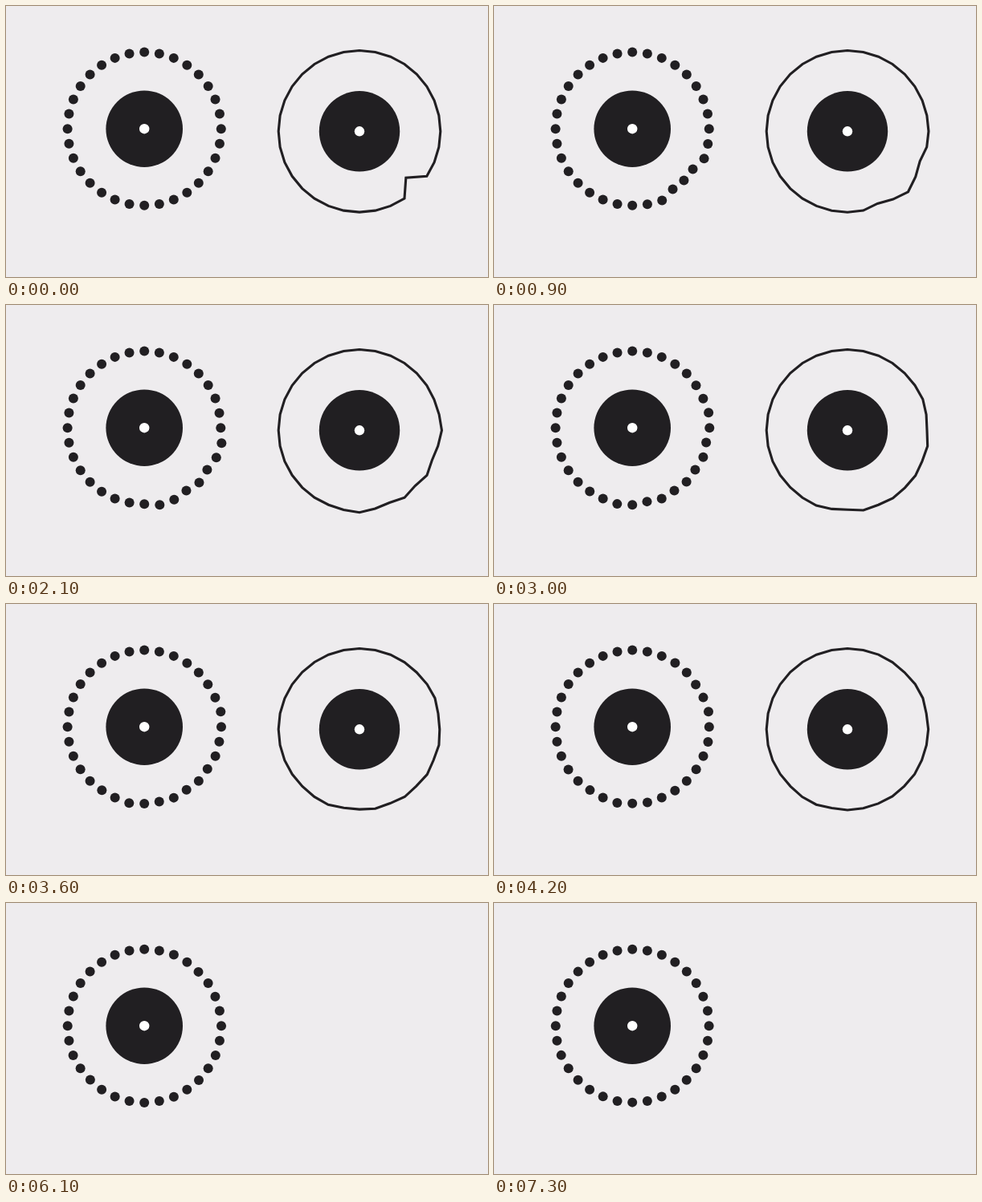
An HTML page with a canvas that plays this animation: 600x338 px, repeating every 7400 ms.

```html
<!DOCTYPE html>
<html lang="en">
<head>
<meta charset="utf-8">
<title>Plucked rings</title>
<style>
  html, body { margin: 0; width: 100%; height: 100%; overflow: hidden; background: #eeecee; }
  canvas { display: block; width: 600px; height: 338px; }
</style>
</head>
<body>
<canvas id="stage"></canvas>
<script>
const W = 600, H = 338, LOOP = 7400, STEP = 100;
const PAPER = '#eeecee', INK = '#211f22';
const TAU = Math.PI * 2;
const COUNT = 32, PLUCK = 4, OUTLINE_END = 4600;

// Spring chain: mean frequency (rad/s), neighbour coupling (rad/s), decay (1/s).
const FREQ = 10.65, COUPLING = 1.75, DECAY = 0.43;

const dotted = { x: 172.2, y: 153.2, radius: 95.6, disc: 47.8, pull: 16.5, release: 220 };
const outlined = { x: 440, y: 156.3, radius: 100.8, disc: 50.2, pull: 19, release: 0 };

const canvas = document.getElementById('stage');
const ctx = canvas.getContext('2d');
const ratio = window.devicePixelRatio || 1;
canvas.width = W * ratio;
canvas.height = H * ratio;
ctx.scale(ratio, ratio);

// Radial offset n points from the plucked one: the sum of the ring's standing waves.
function offset(ring, n, t) {
  const s = (t - ring.release) / 1000;
  if (s < 0) return 0;
  let sum = 0;
  for (let m = 0; m < COUNT; m++) {
    const k = m / COUNT * TAU;
    sum += Math.cos(k * n) * Math.cos((FREQ - COUPLING * Math.cos(k)) * s);
  }
  return -ring.pull * Math.exp(-DECAY * s) * sum / COUNT;
}

function ringPoints(ring, t) {
  return Array.from({ length: COUNT }, (_, i) => {
    const r = ring.radius + offset(ring, i - PLUCK, t);
    const angle = i / COUNT * TAU;
    return [ring.x + r * Math.cos(angle), ring.y + r * Math.sin(angle)];
  });
}

function circle(x, y, r, color) {
  ctx.fillStyle = color;
  ctx.beginPath();
  ctx.arc(x, y, r, 0, TAU);
  ctx.fill();
}

function drawDisc(ring) {
  circle(ring.x, ring.y, ring.disc, INK);
  circle(ring.x, ring.y, 6.2, '#fff');
}

function draw(t) {
  ctx.fillStyle = PAPER;
  ctx.fillRect(0, 0, W, H);

  for (const [x, y] of ringPoints(dotted, t)) circle(x, y, 6, INK);
  drawDisc(dotted);

  if (t >= OUTLINE_END) return;
  ctx.beginPath();
  for (const [x, y] of ringPoints(outlined, t)) ctx.lineTo(x, y);
  ctx.closePath();
  ctx.strokeStyle = INK;
  ctx.lineWidth = 3.1;
  ctx.stroke();
  drawDisc(outlined);
}

const start = performance.now();
function tick() {
  const t = (performance.now() - start) % LOOP;
  draw(Math.floor(t / STEP) * STEP);
  requestAnimationFrame(tick);
}
tick();
</script>
</body>
</html>
```
